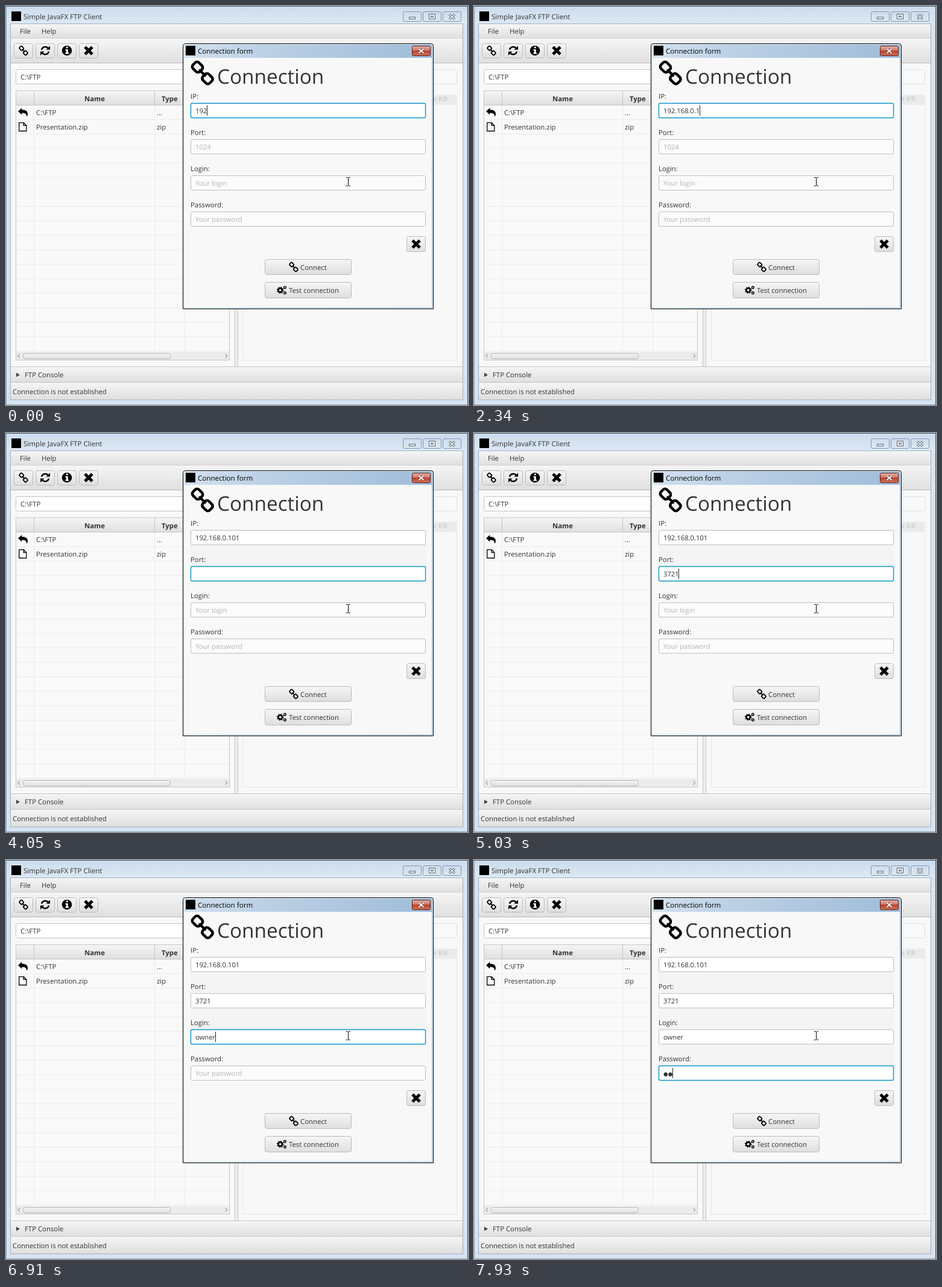
Write an HTML page that moves like this. It is 766 by 662 pixels and loops after 8000 ms.

```html
<!DOCTYPE html>
<html lang="en">
<head>
<meta charset="utf-8">
<title>FTP connection form</title>
<style>
  html, body { margin: 0; width: 100%; height: 100%; overflow: hidden; }
  svg { display: block; width: 766px; height: 662px; }
  text { font: 11.35px "Open Sans", "Noto Sans", sans-serif; fill: #333; text-rendering: geometricPrecision; white-space: pre; }
  .title { font-size: 11.6px; }
  .bold { font-weight: 700; }
  .head { font-size: 33.3px; }
  .input { font-size: 11.25px; }
  .secret { font: 8.8px "DejaVu Sans", sans-serif; }
  .prompt { fill: #b4b4b4; }
  .line { fill: none; stroke: #c4c4c4; }
  .grid { fill: none; stroke: #ececec; }
  .button { fill: url(#button); stroke: #bababa; }
  .frameButton { fill: url(#aero); stroke: #8496a9; }
</style>
</head>
<body>
<svg viewBox="0 0 766 662">
  <defs>
    <linearGradient id="aero" x2="0" y2="1"><stop stop-color="#ccdced"/><stop offset="1" stop-color="#dce8f4"/></linearGradient>
    <linearGradient id="active"><stop stop-color="#d3e1ef"/><stop offset=".3" stop-color="#bdd1e6"/><stop offset="1" stop-color="#9fbcd9"/></linearGradient>
    <linearGradient id="bar" x2="0" y2="1"><stop stop-color="#f5f5f5"/><stop offset="1" stop-color="#dfdfdf"/></linearGradient>
    <linearGradient id="button" x2="0" y2="1"><stop stop-color="#f6f6f6"/><stop offset="1" stop-color="#dedede"/></linearGradient>
    <linearGradient id="red" x2="0" y2="1"><stop stop-color="#e5b0a4"/><stop offset=".45" stop-color="#d27868"/><stop offset=".5" stop-color="#b9412c"/><stop offset="1" stop-color="#d0745a"/></linearGradient>
    <g id="chain" fill="none" stroke="#000" stroke-width="1.92">
      <rect x="-3.38" y="-2.95" width="6.77" height="5.9" rx="1.9" transform="translate(-3.5 -4.1) rotate(45)"/>
      <rect x="-3.38" y="-2.95" width="6.77" height="5.9" rx="1.9" transform="translate(3.5 4.1) rotate(45)"/>
      <path d="M-1.8-1.8 1.8 1.8" stroke-linecap="round"/>
    </g>
    <path id="cross" d="M-6-6 6 6M6-6-6 6" stroke="#000" stroke-width="5"/>
    <g id="gear" fill="none" stroke="#000">
      <circle r="3.3" stroke-width="2.6"/>
      <circle r="5" stroke-width="1.6" stroke-dasharray="1.96"/>
    </g>
  </defs>

  <!-- main window -->
  <rect width="766" height="662" fill="#d6e4f2"/>
  <rect width="766" height="30" fill="url(#aero)"/>
  <path d="M0 .5H766" stroke="#37566b"/>
  <path d="M.5 1V662M0 661.5H766" stroke="#93a5b5"/>
  <path d="M765.5 0V662" stroke="#44525e"/>
  <rect x="9" y="9" width="16" height="16"/>
  <text class="title" x="29" y="22">Simple JavaFX FTP Client</text>
  <g class="frameButton">
    <rect x="658.5" y="9.5" width="30" height="16" rx="2"/>
    <rect x="691.5" y="9.5" width="30" height="16" rx="2"/>
    <rect x="724.5" y="9.5" width="30" height="16" rx="2"/>
  </g>
  <g fill="#fff" stroke="#535c66">
    <rect x="668.5" y="18.5" width="10" height="3"/>
    <rect x="701.5" y="13.5" width="10" height="8"/>
    <rect x="704.5" y="16.5" width="4" height="2"/>
    <path d="M735 14l9 8M744 14l-9 8" stroke-width="3.6"/>
    <path d="M735 14l9 8M744 14l-9 8" stroke="#fff" stroke-width="1.6"/>
  </g>

  <rect x="7.5" y="29.5" width="750" height="624" fill="#f8f8f8" stroke="#a3b1bf"/>
  <rect x="8" y="30" width="749" height="24" fill="url(#bar)"/>
  <text x="23" y="46">File</text>
  <text x="59" y="46">Help</text>
  <rect x="8" y="54" width="749" height="41" fill="url(#bar)"/>
  <path d="M8 53.5H757" stroke="#d2d2d2"/>
  <path d="M8 94.5H757" stroke="#b9b9b9"/>
  <g class="button">
    <rect x="13.5" y="62.5" width="31" height="24" rx="3"/>
    <rect x="49.5" y="62.5" width="31" height="24" rx="3"/>
    <rect x="85.5" y="62.5" width="31" height="24" rx="3"/>
    <rect x="121.5" y="62.5" width="31" height="24" rx="3"/>
  </g>
  <use href="#chain" transform="translate(29 74) scale(.94)"/>
  <g transform="translate(65 74)">
    <path d="M-6-1.5A6.2 6.2 0 0 1 4.5-4.3M6 1.5A6.2 6.2 0 0 1-4.5 4.3" fill="none" stroke="#000" stroke-width="2.5"/>
    <path d="M8-8V-1.5H1.5ZM-8 8V1.5H-1.5Z"/>
  </g>
  <circle cx="101" cy="74" r="8.3"/>
  <path d="M99.8 67.5h3v2.6h-3zM98.4 71.7h4.4v5.7h1.3v2h-5.7v-2h1.4v-3.7h-1.4z" fill="#fff"/>
  <use href="#cross" x="137" y="74"/>

  <!-- local pane -->
  <rect class="line" x="16.5" y="105.5" width="354" height="24" rx="3" style="fill:#fff"/>
  <text x="24" y="122">C:\FTP</text>
  <rect x="16.5" y="140.5" width="354" height="447" fill="#f9f9f9" stroke="#c8c8c8"/>
  <rect x="17" y="141" width="353" height="23" fill="url(#bar)"/>
  <path id="grid" class="grid"/>
  <path class="line" d="M17 164.5H370M46.5 141V164M246.5 141V164M296.5 141V164"/>
  <text class="bold" x="130" y="158">Name</text>
  <text class="bold" x="258" y="158">Type</text>
  <path d="M20 174.7L26.3 169V172.2C32 172.2 36 174 36 179C36 181 35.200 182.500 34 183.500C34.300 179 32 177.400 26.300 177.400V180.500Z"/>
  <path d="M21.700 193.700h7.600l4.500 4.500v9.300h-12.100zM29.200 193.700v4.600h4.600" fill="none" stroke="#000" stroke-width="1.3"/>
  <text x="50" y="181">C:\FTP</text>
  <text x="250" y="181">...</text>
  <text x="50" y="205">Presentation.zip</text>
  <text x="250" y="205">zip</text>
  <rect x="17" y="574" width="353" height="13" fill="#ebebeb"/>
  <rect class="button" x="28.500" y="576.500" width="244" height="9" rx="3"/>
  <path d="M23 577.500l-3.500 3 3.500 3M363.500 577.500l3.500 3-3.500 3" fill="none" stroke="#777"/>
  <rect x="380" y="96" width="5" height="502" fill="#ededed"/>
  <path class="line" d="M379.500 96V598M384.500 96V598"/>

  <!-- remote pane, disabled -->
  <rect x="393.500" y="105.500" width="354" height="24" rx="3" fill="#f9f9f9" stroke="#e1e1e1"/>
  <path d="M393.500 140V587.500H747.500V164" fill="none" stroke="#e6e6e6"/>
  <rect x="394" y="147" width="354" height="17" fill="#ebebeb"/>
  <text class="bold" x="732" y="158" text-anchor="end" style="fill:#d2d2d2">Size KB</text>

  <!-- console and status -->
  <rect x="8" y="599" width="749" height="25" fill="url(#bar)"/>
  <path class="line" d="M8 598.500H757M8 624.500H757"/>
  <path d="M17 608.500v7l6-3.500z" fill="#444"/>
  <text x="31" y="616">FTP Console</text>
  <rect x="8" y="625" width="749" height="28" fill="url(#bar)"/>
  <text x="11" y="644">Connection is not established</text>

  <!-- dialog -->
  <path d="M293.500 502.500V66.500q0-4 4-4H704.500q4 0 4 4V502.500z" fill="url(#active)" stroke="#000"/>
  <path d="M294.500 501.500V67q0-3.500 3.500-3.500H704q3.500 0 3.500 3.500V501.500z" fill="none" stroke="#e3eef8"/>
  <rect x="298" y="66" width="16" height="16"/>
  <text class="title" x="318" y="79" style="fill:#000">Connection form</text>
  <rect x="673.500" y="66.500" width="30" height="16" rx="2" fill="url(#red)" stroke="#57201b"/>
  <path d="M684.500 71l8 7M692.500 71l-8 7" stroke="#6a3a35" stroke-width="3.600"/>
  <path d="M684.500 71l8 7M692.500 71l-8 7" stroke="#fff" stroke-width="2"/>
  <rect x="296" y="86" width="410" height="414" fill="#f8f8f8"/>
  <use href="#chain" transform="translate(325.700 111) scale(2.350)"/>
  <text class="head" x="350" y="129">Connection</text>
  <rect id="tint" x="305" y="160" width="392" fill="#f4f4f4"/>
  <g id="form"></g>
  <path id="caret" stroke="#222"/>
  <g class="button">
    <rect x="664.500" y="382.500" width="31" height="25" rx="3"/>
    <rect x="429.500" y="420.500" width="143" height="25" rx="3"/>
    <rect x="429.500" y="458.500" width="143" height="26" rx="3"/>
  </g>
  <use href="#cross" x="680" y="395"/>
  <use href="#chain" transform="translate(477 433) scale(.94)"/>
  <text x="488" y="438">Connect</text>
  <use href="#gear" x="454.700" y="471.500"/>
  <use href="#gear" transform="translate(462.400 467) scale(.5)"/>
  <use href="#gear" transform="translate(462.400 476) scale(.5)"/>
  <text x="469" y="476">Test connection</text>
  <path d="M564 284.500h2.500l1 1 1-1h2.500M567.500 285v13M564 298.500h2.500l1-1 1 1h2.500" fill="none" stroke="#000"/>
</svg>
<script>
const LOOP = 8000;
const fields = [
  { label: 'IP:', prompt: '', value: '192.168.0.101' },
  { label: 'Port:', prompt: '1024', value: '3721' },
  { label: 'Login:', prompt: 'Your login', value: 'owner' },
  { label: 'Password:', prompt: 'Your password', value: '●●', secret: true },
];

// [time, focused field, characters typed, caret hidden]
const steps = [
  [0, 0, 3], [280, 0, 4], [590, 0, 5], [870, 0, 6], [1160, 0, 7], [1440, 0, 8],
  [1750, 0, 9], [2030, 0, 10], [2340, 0, 11], [2590, 0, 12], [2890, 0, 13], [3330, 0, 13, true],
  [3480, 1, 0], [4050, 1, 0, true], [4320, 1, 1], [4600, 1, 2], [4880, 1, 3], [5030, 1, 4],
  [5190, 2, 0], [5760, 2, 0, true], [6170, 2, 1], [6320, 2, 2], [6600, 2, 3], [6750, 2, 4], [6910, 2, 5],
  [7190, 3, 0], [7620, 3, 0, true], [7770, 3, 1], [7930, 3, 2],
];

const byId = id => document.getElementById(id);
const set = (el, attrs) => {
  for (const name in attrs) el.setAttribute(name, attrs[name]);
  return el;
};
const add = (tag, attrs, text = '') => {
  const el = set(document.createElementNS('http://www.w3.org/2000/svg', tag), attrs);
  el.textContent = text;
  return byId('form').appendChild(el);
};

let rows = 'M46.5 165V573M246.5 165V573M296.5 165V573';
for (let y = 188.5; y < 574; y += 24) rows += `M17 ${y}H370`;
set(byId('grid'), { d: rows });

fields.forEach((field, i) => {
  const top = 161 + 60 * i;
  add('text', { x: 306, y: top - 7 }, field.label);
  field.glow = add('rect', { x: 305.5, y: top - .5, width: 391, height: 26, rx: 3, fill: '#b5e2f1' });
  field.box = add('rect', { x: 306.5, y: top + .5, width: 389, height: 24, rx: 2.5 });
  field.text = add('text', { x: 314, y: top + 17 });
});

function draw(time) {
  const [, focus, typed, hidden] = steps.findLast(step => step[0] <= time);
  fields.forEach((field, i) => {
    const focused = i === focus, pending = i > focus;
    field.text.textContent = pending ? field.prompt : focused ? field.value.slice(0, typed) : field.value;
    set(field.text, { class: pending ? 'input prompt' : field.secret ? 'secret' : 'input' });
    set(field.glow, { visibility: focused ? 'visible' : 'hidden' });
    set(field.box, {
      fill: pending ? '#fbfbfb' : '#fff',
      stroke: focused ? '#1a9ccb' : '#bebebe',
      'stroke-width': focused ? 1.4 : 1,
    });
  });
  const width = typed ? fields[focus].text.getComputedTextLength() : 0;
  set(byId('caret'), {
    d: `M${Math.floor(314 + width) + .5} ${165 + 60 * focus}v17`,
    visibility: hidden ? 'hidden' : 'visible',
  });
  set(byId('tint'), { height: focus ? 27 + 60 * focus : 0 });
}

const start = performance.now();
function tick() {
  draw((performance.now() - start) % LOOP);
  requestAnimationFrame(tick);
}
tick();
</script>
</body>
</html>
```
